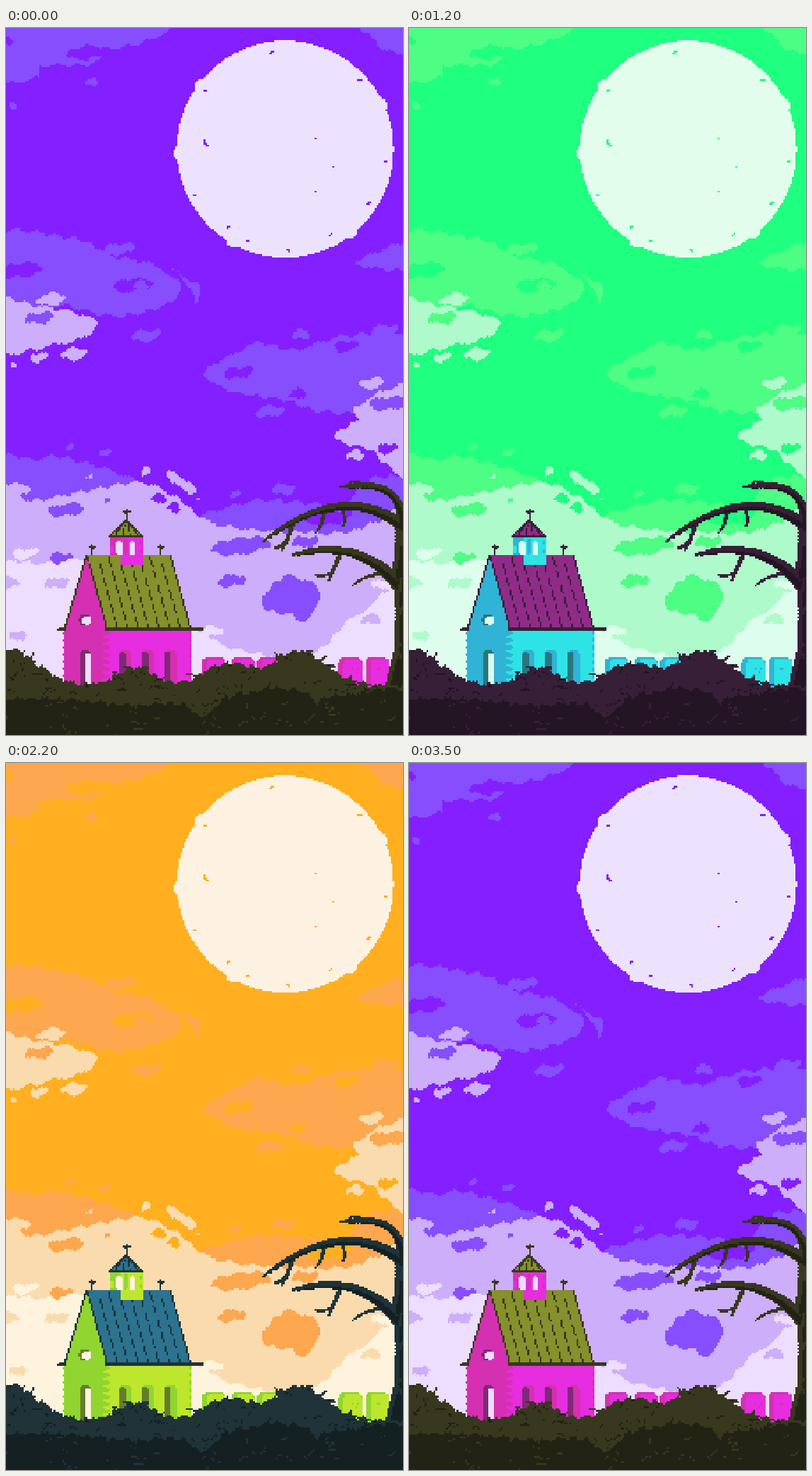
An HTML page with a canvas for the animation above (3.6 s loop, 561 by 998 pixels).

```html
<!DOCTYPE html>
<html lang="en">
<head>
<meta charset="utf-8">
<title>Chapel under the moon</title>
<style>
html, body { margin: 0; width: 100%; height: 100%; overflow: hidden; }
canvas { display: block; width: 561px; height: 998px; image-rendering: pixelated; }
</style>
</head>
<body>
<canvas id="stage" width="225" height="400"></canvas>
<script>
const W = 225, H = 400;
const screen2d = document.getElementById('stage').getContext('2d');
const brush = Object.assign(document.createElement('canvas'), { width: W, height: H })
  .getContext('2d', { willReadFrequently: true });
brush.scale(W / 561, H / 998);
brush.lineCap = brush.lineJoin = 'round';

// Hue, saturation and lightness at the start of the loop.
const PALETTE = [
  [267, 100, 56], [259, 98, 65], [264, 88, 83], [269, 93, 93], [263, 88, 94],
  [313, 66, 51], [302, 79, 54], [306, 49, 33], [66, 53, 37], [60, 29, 17], [60, 24, 11]
];
const [SKY, CLOUD, LIGHT, PALE, MOON, GABLE, WALL, SHADE, ROOF, BARK, DARK] = PALETTE.keys();
const pixels = new Uint8Array(W * H);

let seed = 7;
const rnd = (a = 0, b = 1) => {
  seed = (seed * 16807) % 2147483647;
  return a + (b - a) * seed / 2147483647;
};
const range = (n, f) => Array.from({ length: n }, (_, i) => f(i));
const bump = (x, center, width) => Math.exp(-(((x - center) / width) ** 2));

const tuples = (text, size) => {
  const n = text.split(/[\s,]+/).map(Number);
  return range(n.length / size, i => n.slice(i * size, (i + 1) * size));
};

// Draws with hard pixel edges, optionally only over one other color.
function paint(color, draw, { ragged = false, over = -1 } = {}) {
  brush.clearRect(0, 0, 561, 998);
  draw();
  const { data } = brush.getImageData(0, 0, W, H);
  for (let y = 0; y < H; y++) for (let x = 0; x < W; x++) {
    const lift = ragged ? Math.round(0.75 * Math.sin(x * 0.55 + 2 * Math.sin(y * 0.21))) : 0;
    const row = Math.min(H - 1, Math.max(0, y + lift));
    const i = y * W + x;
    if (data[(row * W + x) * 4 + 3] > 127 && (over < 0 || pixels[i] === over)) pixels[i] = color;
  }
}

// A cloud bank: a smooth closed curve through a few points.
function bank(color, text) {
  const p = tuples(text, 2), n = p.length;
  paint(color, () => {
    brush.beginPath();
    brush.moveTo(...p[0]);
    p.forEach((b, i) => {
      const a = p[(i + n - 1) % n], c = p[(i + 1) % n], d = p[(i + 2) % n];
      brush.bezierCurveTo(b[0] + (c[0] - a[0]) / 7, b[1] + (c[1] - a[1]) / 7,
        c[0] - (d[0] - b[0]) / 7, c[1] - (d[1] - b[1]) / 7, c[0], c[1]);
    });
    brush.fill();
  }, { ragged: true });
}

// Small flat puffs, each given as x, y and half its width.
function puffs(color, text) {
  paint(color, () => tuples(text, 3).forEach(([x, y, r]) => {
    brush.beginPath();
    brush.ellipse(x, y, r, 4.5 + r * 0.16, r > 9 ? -0.12 : 0, 0, 7);
    brush.fill();
  }), { ragged: true });
}

function specks(color, count, x, y, spread) {
  paint(color, () => range(count, () =>
    brush.fillRect(x + rnd(-spread, spread), y + rnd(-spread, spread) / 2, 2.5, 2.5)));
}

const rects = (color, ...list) => paint(color, () => list.forEach(r => brush.fillRect(...r)));
const arches = (color, ...list) => paint(color, () => list.forEach(([x, y, w, h]) => {
  brush.beginPath();
  brush.roundRect(x, y, w, h, [w / 2, w / 2, 0, 0]);
  brush.fill();
}));

function poly(color, text) {
  paint(color, () => {
    brush.beginPath();
    tuples(text, 2).forEach(p => brush.lineTo(...p));
    brush.fill();
  });
}

function disc(color, x, y, r) {
  paint(color, () => {
    brush.beginPath();
    brush.arc(x, y, r, 0, 7);
    brush.fill();
  });
}

function line(points, width) {
  brush.lineWidth = width;
  brush.beginPath();
  points.forEach(p => brush.lineTo(...p));
  brush.stroke();
}

function drawMoon(x, y, r) {
  disc(MOON, x, y, r);
  [52, 120, 178, 217, 335].forEach(deg => {
    const a = deg * Math.PI / 180;
    disc(MOON, x + (r - 6) * Math.cos(a), y + (r - 6) * Math.sin(a), 11);
  });
  // Craters lie just inside the rim, with a few specks further in.
  paint(SKY, () => {
    [7, 33, 62, 88, 112, 126, 153, 216, 262, 317].forEach((deg, i) => {
      const a = deg * Math.PI / 180, d = r - 10 - i % 3 * 3;
      const px = x + d * Math.cos(a), py = y + d * Math.sin(a);
      line([[px - 2, py + i % 3], [px + 2, py - i % 3]], 3);
    });
    line([[280, 158], [281, 163], [286, 167]], 3);
    tuples('436 154 461 194 436 230', 2).forEach(p => brush.fillRect(...p, 2.5, 2.5));
  });
}

function drawSky() {
  bank(CLOUD, '-9 -9 232 -9 195 20 141 32 125 50 52 54 45 70 -9 72');
  bank(CLOUD, '495 -9 522 18 535 31 570 36 570 -9');
  drawMoon(394.5, 171, 153);
  bank(CLOUD, '-9 290 90 297 118 304 150 322 205 333 245 360 235 386 180 404 130 404 85 392 -9 392');
  bank(CLOUD, '245 349 274 365 268 388 262 368');
  bank(CLOUD, '493 333 535 312 570 303 570 341');
  bank(CLOUD, '281 483 318 462 355 444 410 454 480 434 570 440 570 535 450 542 395 526 320 514 288 496');
  bank(CLOUD, '-9 606 40 610 75 605 140 622 182 641 190 690 -9 690');
  bank(CLOUD, '274 700 340 669 385 667 475 672 510 638 570 640 570 730');
  puffs(CLOUD, '120 77 9 10 111 6 160 312 22 198 434 22 417 433 13 535 426 20 373 541 21 141 599 8 90 592 6 392 651 17 324 659 7');
  puffs(SKY, '114 35 29 0 20 9 22 342 31 180 363 29 329 486 21 481 449 17 412 517 13 455 691 34');
  puffs(CLOUD, '190 364 11');
  specks(CLOUD, 4, 238, 342, 7);

  bank(LIGHT, '-9 384 40 391 100 402 130 420 98 442 70 446 14 460 -9 456');
  bank(LIGHT, '570 508 500 530 490 541 498 552 465 574 475 586 515 595 535 615 570 631');
  bank(LIGHT, '-9 658 35 668 110 654 190 641 240 662 285 696 345 708 400 711 480 712 530 694 570 692 570 960 -9 960');
  bank(LIGHT, '226 630 240 628 268 648 264 657 240 646');
  puffs(LIGHT, '63 383 21 47 464 13 96 460 20 12 475 4 516 502 18 493 603 13 199 627 7 15 651 20');
  specks(LIGHT, 7, 115, 632, 9);
  specks(LIGHT, 4, 267, 662, 5);
  puffs(SKY, '540 593 15 216 664 11 237 677 9');
  puffs(CLOUD, '48 409 21 540 530 28 85 680 26 78 748 18 332 731 43 319 780 21 423 725 19 144 665 4');
  bank(CLOUD, '361 808 378 786 398 773 432 784 444 806 425 838 400 827 370 823');

  bank(PALE, '-9 768 60 757 150 750 250 840 270 848 310 872 385 888 440 880 475 845 505 822 570 786 570 960 -9 960');
  puffs(PALE, '28 742 19 533 785 17 292 851 15');
  puffs(LIGHT, '4 784 16 72 784 17 17 858 12 515 835 15');
}

function drawStones() {
  const stones = [277, 318, 355, 470, 508].map(x => [x, 889, 33, 45]);
  paint(GABLE, () => stones.forEach(([x, y, w, h]) => {
    brush.beginPath();
    brush.roundRect(x, y, w, h, 7);
    brush.fill();
  }));
  paint(WALL, () => stones.forEach(([x, y, w, h]) => {
    brush.beginPath();
    brush.roundRect(x + 7, y + 2, w - 7, h, 6);
    brush.fill();
  }));
  specks(GABLE, 6, 490, 904, 8);
  specks(GABLE, 4, 525, 904, 6);
}

function cross(x, y, height, arm) {
  line([[x, y], [x, y + height]], 2.6);
  line([[x - arm, y + 5], [x + arm, y + 5]], 2.6);
}

function drawChurch() {
  const left = 82, corner = 142, right = 261, eaves = 848, top = 743, base = 932;
  const lean = y => (y - top) * 0.275;

  poly(GABLE, `114 ${top} ${left} ${eaves} ${left} ${base} ${corner} ${base} ${corner} ${eaves}`);
  rects(WALL, [corner, eaves - 2, right - corner, base - eaves]);
  const quoins = (x, shift) => range(8, i => [x, eaves + 4 + shift + i * 10, 4, 5]);
  rects(GABLE, ...quoins(corner, 0), ...quoins(right - 2, 0), ...quoins(left - 2, 0));
  rects(WALL, ...quoins(corner - 4, 5));

  poly(ROOF, `113 ${top} 232 ${top} ${right} ${eaves} ${corner} ${eaves}`);
  paint(BARK, () => {
    line([[114, top + 1], [left + 1, eaves]], 2.5);
    const seam = (x, from, to) => line([[x + lean(from), from], [x + lean(to), to]], 2.4);
    range(9, i => {
      const x = 114 + i * 14.75;
      if (i % 8 === 0) return seam(x, top + 1, eaves - 2);
      for (let y = top + 4 + i % 2 * 9; y < eaves - 4; y += 19) seam(x, y, Math.min(eaves - 2, y + 13));
    });
    line([[73, eaves], [83, eaves]], 2.5);
    line([[corner - 2, eaves], [280, eaves]], 2.5);
    cross(122, 728, 15, 5);
    cross(219, 728, 15, 5);
  });

  rects(GABLE, [146, 719, 48, 24]);
  rects(WALL, [163, 719, 31, 39], [148, 730, 4, 12]);
  rects(GABLE, [167, 721, 4, 22], [189, 724, 4, 5], [189, 735, 4, 5]);
  arches(PALE, [155, 724, 10, 18], [174, 724, 9, 18]);
  poly(ROOF, '170 693 197 719 143 719');
  paint(BARK, () => {
    cross(170, 678, 18, 6);
    line([[145, 718], [170, 695], [195, 718], [145, 718]], 2.5);
    range(4, i => line([[170 + (i - 1.5) * 4, 701], [170 + (i - 1.5) * 11, 717]], 2.2));
  });

  disc(SHADE, 111, 836, 8);
  disc(PALE, 114, 836, 6.6);
  arches(SHADE, [104, 878, 16, 54]);
  rects(PALE, [113, 882, 7, 50]);
  const windows = [160, 192, 224];
  arches(GABLE, ...windows.map(x => [x, 877, 17, 52]));
  arches(SHADE, ...windows.map(x => [x, 880, 9, 49]));
}

// A tapering branch along a quadratic curve.
function limb([x0, y0, x1, y1, x2, y2], from, to, shift = 0) {
  const at = t => [x0, y0].map((v, i) =>
    (1 - t) ** 2 * v + 2 * t * (1 - t) * [x1, y1][i] + t * t * [x2, y2][i] + i * shift);
  range(24, i => line([at(i / 24), at((i + 1) / 24)], from + (to - from) * i / 24));
}

function drawTree() {
  const limbs = [
    [556, 788, 499, 717, 406, 743],
    [562, 704, 477, 636, 364, 724],
    [560, 694, 553, 632, 474, 648]
  ];
  const trunk = y => 550 - 13 * bump(y, 930, 40) - 5 * bump(y, 770, 22);
  const column = (inset, from) => {
    for (let y = from; y < 935; y++) brush.fillRect(trunk(y) + inset, y, 40, 1.5);
  };
  paint(BARK, () => {
    limbs.forEach((l, i) => limb(l, 19 - i * 3, 4));
    column(0, 700);
    limb([545, 768, 510, 770, 488, 788], 6, 2);
    limb([472, 744, 462, 766, 456, 781], 6, 3);
    limb([462, 768, 450, 776, 436, 772], 4, 2);
    limb([405, 700, 400, 718, 390, 738], 6, 3);
    limb([398, 722, 388, 734, 380, 733], 5, 3);
    limb([450, 684, 446, 702, 438, 712], 5, 2);
    limb([474, 680, 482, 692, 476, 703], 4, 2);
    limb([505, 645, 496, 636, 485, 642], 4, 2);
  });
  paint(DARK, () => {
    limbs.forEach((l, i) => limb(l, 8 - i, 1, 4));
    column(7, 730);
  });
  paint(BARK, () => range(10, () => {
    const x = rnd(554, 561), y = rnd(740, 890);
    line([[x, y], [x - 3, y + rnd(9, 20)]], 2);
  }));
}

function drawBushes() {
  const ridge = x => 929 - 53 * bump(x, 0, 60) - 27 * bump(x, 183, 36)
    - 32 * bump(x, 312, 45) - 49 * bump(x, 416, 52);
  const shadow = x => 946 + 10 * bump(x, 180, 70) + 24 * bump(x, 278, 22)
    - 14 * bump(x, 385, 60) + 12 * bump(x, 440, 12) - 14 * bump(x, 540, 50);
  const below = edge => range(W, i => {
    const x = (i + 0.5) * 561 / W;
    brush.fillRect(x - 1.25, edge(x) + 2 * Math.sin(i * 0.8) + rnd(-2, 2), 2.6, 998);
  });
  const strands = (count, edge, depth, width) => range(count, () => {
    const x = rnd(0, 561), y = edge(x) + rnd(0, depth), dx = rnd(-16, 16);
    line([[x, y], [x + dx * 0.5, y + rnd(-4, 3)], [x + dx, y + rnd(-6, 5)]], width);
  });
  paint(BARK, () => {
    below(ridge);
    strands(85, ridge, 4, 2.5);
  });
  paint(DARK, () => below(shadow));
  paint(DARK, () => strands(110, ridge, 60, 2), { over: BARK });
  paint(BARK, () => strands(45, shadow, 50, 1.9), { over: DARK });
}

drawSky();
drawStones();
drawChurch();
drawTree();
drawBushes();

const STEP = 100, STEPS = 36;

// One full turn of hue, slightly slower at first.
const turnAt = u => 360 * u - 3 * Math.sin(2 * Math.PI * u);

function rgb(h, s, l) {
  const a = s / 100 * Math.min(l, 100 - l);
  return [0, 8, 4].map(n => {
    const k = (n + h / 30) % 12;
    return 2.55 * (l - a * Math.max(-1, Math.min(k - 3, 9 - k, 1)));
  });
}

const image = screen2d.createImageData(W, H);
let shown = -1;

function render(time) {
  const step = Math.floor(time / STEP) % STEPS;
  if (step === shown) return;
  shown = step;
  const turn = turnAt(step / (STEPS - 1));
  const colors = PALETTE.map(([h, s, l]) => rgb((h - turn + 720) % 360, s, l));
  pixels.forEach((c, i) => image.data.set([...colors[c], 255], i * 4));
  screen2d.putImageData(image, 0, 0);
}

const start = performance.now();
function tick() {
  render(performance.now() - start);
  requestAnimationFrame(tick);
}
tick();
</script>
</body>
</html>
```
